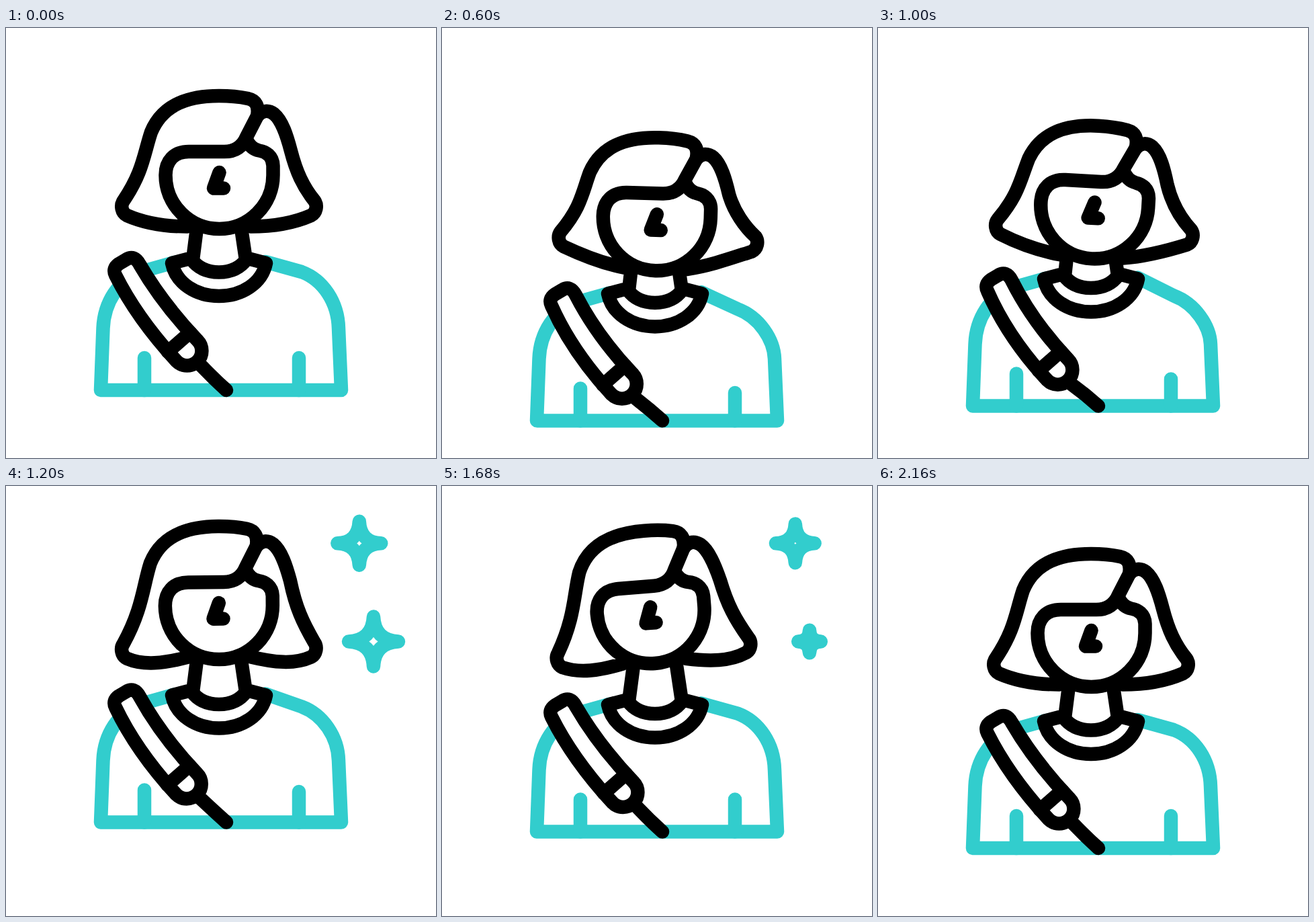
Recreate the animation shown at these times as an HTML page. Size 640 by 640 pixels, loop 2400 ms.

```html
<!DOCTYPE html>
<html lang="en">
<head>
<meta charset="utf-8">
<title>Woman avatar</title>
<style>
  html, body { margin: 0; height: 100%; overflow: hidden; background: #fff; }
  svg { display: block; width: 100%; height: 100%; fill: none; stroke: #000; stroke-width: 20.5; stroke-linecap: round; stroke-linejoin: round; }
  .teal { stroke: #32cdcd; }
  .solid { fill: #fff; }
</style>
</head>
<body>
<svg id="stage" viewBox="0 0 640 640"></svg>
<script>
const LOOP = 2400, STEP = 40;
const stage = document.getElementById('stage');

const unit = v => Math.min(1, Math.max(0, v));

function ease(t, from, to) {
  const u = unit((t - from) / (to - from));
  return u * u * (3 - 2 * u);
}

// Sink by `down`, rise to `-up`, then settle at 0.
const sway = (t, down, up) =>
  down * ease(t, 200, 715) - (down + up) * ease(t, 840, 1305) + up * ease(t, 1420, 1920);

// Grow from 0 to 1 at the peak and shrink back.
const pulse = (t, from, peak, to) =>
  Math.sin(Math.PI / 2 * unit(t < peak ? (t - from) / (peak - from) : (to - t) / (to - peak)));

const path = (d, cls = '') => `<path class="${cls}" d="${d}"/>`;
const group = (transform, ...parts) => `<g transform="${transform}">${parts.join('')}</g>`;

function star(x, y, r) {
  if (r < 0.5) return '';
  const k = r * 0.05;
  return group(`translate(${x} ${y})`,
    path(`M0 ${-r}Q${k} ${-k} ${r} 0Q${k} ${k} 0 ${r}Q${-k} ${k} ${-r} 0Q${-k} ${-k} 0 ${-r}Z`, 'teal'));
}

function torso(y, sag) {
  const s = sag * 1.5;
  return group(`translate(0 ${y})`,
    path(`M250 349L200 363C168 375 146 408 144.5 447L141 539H499L495 447
      C494 ${408 + s} 472 ${375 + s} 440 ${363 + s}L386 348`, 'teal'),
    path(`M206 491V539M436 ${491 + sag}V539`, 'teal'),
    path(`M247 350C253 380 283 399 317 399S381 380 387 350L364 344H358
      C348 358 333 363.5 317 363.5S286 358 276 344H270Z`, 'solid'));
}

function syringe(y, sag) {
  const p = (px, py) => `${px - sag * 0.25} ${py + sag * 0.6} `;
  return group(`translate(0 ${y})`,
    path(`M${p(290, 502)}Q309 522 328 539`),
    path(`M163 368Q${p(195, 432)}${p(254, 496)}A21.5 21.5 0 0 0 ${p(285, 465)}
      Q${p(232, 409)}199 352Q191 337 179 344.5L168 351Q158 358 163 368Z`, 'solid'),
    path(`M${p(241, 482)}L${p(274, 453)}`));
}

function neck(body, head) {
  const pinch = (body - head) * 0.15;
  return path(`M${284 + pinch} ${298 + head}L278 ${345 + body}M${350 - pinch} ${298 + head}L357 ${345 + body}`);
}

function head(y, turn) {
  // Hair tips trail behind the head.
  const lag = -y * (y > 0 ? 0.2 : 0.43);
  const flare = Math.max(0, -lag) * 0.5;
  const low = n => n + lag, mid = n => n + lag * 0.5, out = n => n + flare;
  return group(`translate(0 ${y}) rotate(${turn} 317 305)`,
    path(`M270 295.5C235 ${mid(295.5)} 205 ${low(290)} 180 ${low(279)}
      C172 ${low(275)} 170 ${low(264)} 175 ${low(257)}C204 ${mid(214)} 205 188 216 155
      C231 119 263 101 317 101C332 101 346 102 360 105Q378 109 374 131
      L358 162Q349 184 325 184H272C250 184 237.5 198 237.5 219
      A80 80 0 0 0 397.5 219V205C397 190 386 184 377 182.5Q364 180 358 166`),
    path(`M374 131C382 122 391 122 399 128C411 138 418 160 424 183
      C432 ${mid(214)} ${out(442)} ${mid(236)} ${out(459)} ${low(257)}
      C${out(464)} ${low(264)} ${out(462)} ${low(275)} ${out(454)} ${low(279)}
      C429 ${low(290)} 399 ${mid(295.5)} 364 295.5`),
    path('M317.5 215L309 238.5H324'));
}

function draw(now) {
  const t = Math.floor(now % LOOP / STEP) * STEP;
  const bodyY = sway(t, 52, 52);
  const headY = sway(t - 20, 75, 66);
  const sag = sway(t - 60, 9, 0);
  const turn = sway(t - 150, 3.2, 5.3);
  stage.innerHTML = torso(bodyY, sag) + neck(bodyY, headY) + syringe(bodyY, sag) + head(headY, turn)
    + star(525.8, 85.3, 54 * pulse(t, 1040, 1430, 1820))
    + star(547, 231.5, 40 * pulse(t, 1020, 1260, 1840));
}

const start = performance.now();
function frame() {
  draw(performance.now() - start);
  requestAnimationFrame(frame);
}
frame();
</script>
</body>
</html>
```
